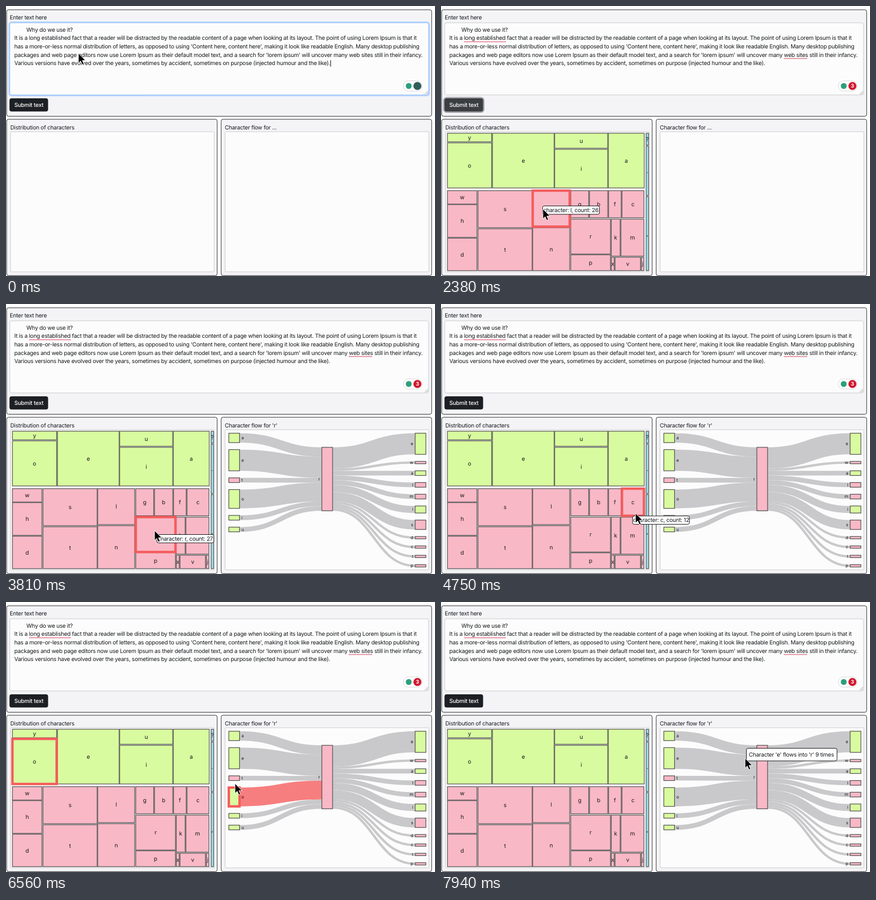
Animation, 800 px wide and 503 px high, one loop 8000 ms. Source, as an HTML page:

```html
<!DOCTYPE html>
<html lang="en">
<head>
<meta charset="utf-8">
<title>Character flow</title>
<style>
  html, body { margin: 0; width: 100%; height: 100%; overflow: hidden; background: #fff; }
  svg { display: block; width: 800px; height: 503px; }
  text { font: 10.5px Inter, "Open Sans", sans-serif; letter-spacing: -.243px; fill: #15181b; white-space: pre; text-rendering: geometricPrecision; }
  .mid { text-anchor: middle; letter-spacing: 0; }
  .small { font-size: 8px; letter-spacing: 0; }
  .end { text-anchor: end; }
  .button { font-weight: 500; fill: #fff; }
  .badge { font-size: 9.5px; font-weight: 700; fill: #fff; }
  .panel { fill: #f4f4f7; stroke: #2b2b2d; }
  .box { fill: #fcfcfc; stroke: #cbcbcd; }
  .vowel { fill: #d9fb9f; }
  .consonant { fill: #f9b8c6; }
  .other { fill: #a0e0f0; }
  .cell { stroke: #4b4b4b; stroke-width: 1.2; }
  .hot { stroke: #f55c5c; stroke-width: 4.5; }
  .link { fill: none; stroke: #c9c9cb; }
  .link.on { stroke: #f77e7e; }
  .tip { fill: #fff; stroke: #111; }
</style>
</head>
<body>
<svg id="stage" viewBox="0 0 800 503"></svg>
<script>
const LOOP = 8000, STEP = 62.5;
const CHECKED = 560, PRESS = 1300, TREEMAP = 1500, PICK = 3430;

const lines = [
  "It is a long established fact that a reader will be distracted by the readable content of a page when looking at its layout. The point of using Lorem Ipsum is that it",
  "has a more-or-less normal distribution of letters, as opposed to using 'Content here, content here', making it look like readable English. Many desktop publishing",
  "packages and web page editors now use Lorem Ipsum as their default model text, and a search for 'lorem ipsum' will uncover many web sites still in their infancy.",
  "Various versions have evolved over the years, sometimes by accident, sometimes on purpose (injected humour and the like)."
];

// Treemap cells: left, top, right, bottom
const groups = {
  vowel: {
    y: [12, 237, 94.5, 253], o: [12, 255, 94.5, 339], e: [96, 237, 211, 339],
    u: [212, 237, 311, 265], i: [212, 267, 311, 339], a: [312, 237, 379, 339]
  },
  consonant: {
    w: [12, 344, 67, 369], h: [12, 370, 67, 431], d: [12, 432.5, 67, 493],
    s: [69, 344, 170, 413], t: [69, 415, 170, 493], l: [171, 344, 240, 411], n: [171, 413, 240, 493],
    g: [242, 344, 275.5, 394.5], b: [277, 344, 311, 394.5], f: [312.5, 344, 336, 394.5], c: [337.5, 344, 378.5, 394.5],
    r: [242, 397, 316, 462], p: [242, 463.5, 316, 493], k: [317.5, 397, 334, 466], m: [335.5, 397, 378.5, 466],
    x: [317.5, 468, 323, 493], v: [324.5, 468, 372, 493], j: [373.5, 468, 378.5, 493]
  },
  other: { "?": [382.5, 237, 387, 259], ".": [382.5, 261, 387, 353], ",": [382.5, 355, 387, 493] }
};
const cells = Object.entries(groups).flatMap(([kind, set]) =>
  Object.entries(set).map(([char, [x, y, right, bottom]]) => ({ kind, char, x, y, w: right - x, h: bottom - y })));

// Sankey: counts of characters before and after "r"
const UNIT = 4.38, GAP = 13.1, HUB = { kind: "consonant", char: "r", x: 589, y: 267, w: 20, h: 27 * UNIT };
function column(spec, x) {
  let y = 240.7, hubY = HUB.y;
  return spec.split(" ").map(([char, count]) => {
    const h = count * UNIT;
    const node = { char, count, x, y, w: 20, h, hubY: hubY + h / 2, kind: "aeiou".includes(char) ? "vowel" : "consonant" };
    y += h + GAP;
    hubY += h;
    return node;
  });
}
const sources = column("a4 e9 t2 o8 i2 u2", 415.5);
const targets = column("e9 w1 a2 l2 m2 i3 s4 d1 c1 t1 p1", 763);

// Pointer path: time, x, y
const path = [
  [0, 135, 88], [250, 132, 100], [600, 96, 190], [800, 92, 206], [1100, 76, 189], [1250, 72.5, 186], [1562, 72.5, 186],
  [1875, 110, 250], [2125, 165, 330], [2312.5, 187.5, 371.5], [2375, 190, 378], [2600, 215, 395], [2900, 255, 430],
  [3100, 281, 432], [3750, 279.5, 428.5], [3812.5, 277, 422], [4200, 282, 420], [4600, 345, 400], [5000, 392, 372],
  [5375, 412, 358], [5437.5, 416, 357], [5700, 427, 362], [6400, 429, 360], [6500, 428, 350], [6562.5, 427, 338],
  [6800, 428, 305], [7100, 440, 292], [7500, 500, 290], [7875, 564, 291], [7937.5, 567, 291]
];
const clamp = v => Math.max(0, Math.min(1, v));
function pointerAt(t) {
  const next = Math.max(1, path.findIndex(key => key[0] >= t));
  const [t0, x0, y0] = path[next - 1], [t1, x1, y1] = path[next];
  const k = clamp((t - t0) / (t1 - t0));
  return { x: x0 + (x1 - x0) * k, y: y0 + (y1 - y0) * k };
}
const inside = (p, r) => p.x >= r.x && p.x <= r.x + r.w && p.y >= r.y && p.y <= r.y + r.h;
function onSourceLink(p, node) {
  const k = (p.x - node.x - node.w) / (HUB.x - node.x - node.w);
  if (k < 0 || k > 1) return false;
  const from = node.y + node.h / 2;
  return Math.abs(p.y - from - (node.hubY - from) * k * k * (3 - 2 * k)) < node.h / 2;
}

const rect = (x, y, w, h, cls, rx = 0, more = "") =>
  `<rect x="${x}" y="${y}" width="${w}" height="${h}" rx="${rx}" class="${cls}" ${more}/>`;
const text = (x, y, str, cls = "") => `<text x="${x}" y="${y}" class="${cls}">${str}</text>`;
const shape = (r, hot) => rect(r.x, r.y, r.w, r.h, `${r.kind} ${hot ? "hot" : "cell"}`);
const line = (d, color, width = 1) => `<path d="${d}" fill="none" stroke="${color}" stroke-width="${width}"/>`;
function link(x0, y0, x1, y1, width, on) {
  const mid = (x0 + x1) / 2;
  return `<path class="link ${on ? "on" : ""}" stroke-width="${width}" d="M${x0} ${y0}C${mid} ${y0} ${mid} ${y1} ${x1} ${y1}"/>`;
}

const panels = rect(1.2, 7, 792.6, 198.4, "panel", 3.5) + rect(1.2, 211, 392.6, 291.3, "panel", 3.5) +
  rect(401.2, 211, 392.6, 291.3, "panel", 3.5) + rect(8.5, 234.2, 379.7, 261, "box", 1) +
  rect(408.5, 234.2, 380, 261, "box", 1) + text(7, 24.5, "Enter text here") +
  text(8, 229.5, "Distribution of characters");
const paragraph = text(38, 47.5, "Why do we use it?") +
  lines.map((str, i) => text(15.5, 63.2 + i * 15.75, str)).join("");

function form(t, pointer) {
  const focus = 1 - clamp((t - PRESS) / 150);
  const buttonFocus = t < PICK ? 1 - focus : 0;
  const button = { x: 6.5, y: 172, w: 72, h: 24.5 };
  const active = buttonFocus || inside(pointer, button);
  let out = "";
  if (focus) out += rect(7, 31.3, 781, 134.4, "", 3.5, `fill="none" stroke="#b9d6fe" stroke-width="${5.2 * focus}"`);
  out += rect(7, 31.3, 781, 134.4, "box", 3.5, focus ? 'style="stroke:#8fbcfb"' : "") + paragraph;
  if (t < PRESS && t % 1000 < 500) out += line("M605.5 101V113", "#111");
  if (t >= CHECKED) out += line("M43 66.7H121M639 97.8H683", "#dc6478", 1.3);
  out += line("M781 164.5L787 158.5M784.5 164.5L787 162", "#777", .8);
  out += rect(741, 139.5, 35, 19, "", 9, 'fill="#fff" stroke="#dadade"') +
    '<circle cx="751" cy="149" r="5.5" fill="#2c9f7c"/>' +
    `<circle cx="767.2" cy="149" r="7.5" fill="${t < CHECKED ? "#305f57" : "#d0182f"}"/>`;
  if (t >= CHECKED) out += text(767.2, 152.4, "3", "mid badge");
  if (buttonFocus) out += rect(button.x, button.y, button.w, button.h, "", 4, `fill="none" stroke="#a5a6a9" stroke-width="${5 * buttonFocus}"`);
  return out + rect(button.x, button.y, button.w, button.h, "", 4, `fill="${active ? "#3a3e41" : "#1c1f23"}"`) +
    text(15.5, 187.7, "Submit text", "button");
}

function treemap(hot) {
  const active = cells.find(c => c.char === hot);
  return cells.map(c => shape(c)).join("") + (active ? shape(active, true) : "") +
    cells.map(c => text(c.x + c.w / 2, c.y + c.h / 2 + 3.8, c.char, "mid")).join("");
}

function sankey(hot) {
  const center = n => n.y + n.h / 2;
  const active = sources.find(n => n.char === hot);
  return sources.map(n => link(n.x + n.w, center(n), HUB.x, n.hubY, n.h, n === active)).join("") +
    targets.map(n => link(HUB.x + HUB.w, n.hubY, n.x, center(n), n.h)).join("") +
    [...sources, ...targets, HUB].map(n => shape(n, n === active)).join("") +
    sources.map(n => text(439, center(n) + 2.6, n.char, "small")).join("") +
    [...targets, HUB].map(n => text(n.x - 3.5, center(n) + 2.6, n.char, "small end")).join("");
}

function render(t) {
  const pointer = pointerAt(t), lagged = pointerAt(t - STEP); // hover follows one step late
  const hasMap = t >= TREEMAP, hasFlow = t >= PICK;
  const cell = hasMap && cells.find(c => inside(lagged, c));
  const node = hasFlow && sources.find(n => inside(lagged, n));
  const flow = hasFlow && !node && sources.find(n => onSourceLink(lagged, n));

  let out = panels + form(t, pointer) + text(408, 229.5, `Character flow for ${hasFlow ? "'r'" : "..."}`);
  if (hasMap) out += treemap((cell || node || {}).char);
  if (hasFlow) out += sankey(node && node.char);
  if (cell) {
    const x = lagged.x + 2, y = lagged.y + 1;
    const count = Math.max(1, Math.round(cell.w * cell.h / 178));
    out += rect(x, y, 106, 15.5, "tip", 3) + text(x + 1, y + 11.5, `character: ${cell.char}, count: ${count}`);
  }
  if (flow) {
    const x = lagged.x + 5.5, y = lagged.y - 18.5;
    out += rect(x, y, 169, 23.5, "tip", 3.5) +
      text(x + 4.5, y + 15.5, `Character '${flow.char}' flows into 'r' ${flow.count} times`);
  }
  out += `<path transform="translate(${pointer.x} ${pointer.y})" d="M0 0V18.5L4.2 14.6L7.2 21.3L10.3 20L7.4 13.4H13.2Z" fill="#000" stroke="#fff"/>`;
  document.getElementById("stage").innerHTML = out;
}

let shown = -1;
function tick() {
  const step = Math.floor((performance.now() % LOOP + 5) / STEP) % (LOOP / STEP);
  if (step !== shown) render((shown = step) * STEP);
  requestAnimationFrame(tick);
}
tick();
</script>
</body>
</html>
```
